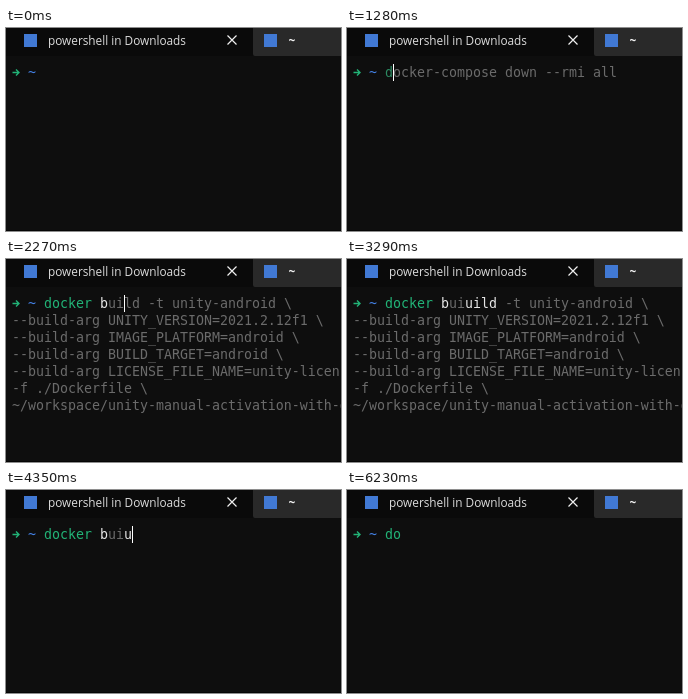
An HTML page with a canvas that plays this animation: 335x203 px, repeating every 6.3 s.

```html
<!DOCTYPE html>
<html lang="en">
<head>
<meta charset="utf-8">
<title>Terminal</title>
<style>
html, body { margin: 0; width: 100%; height: 100%; overflow: hidden; background: #0e0e0e; }
canvas { display: block; }
</style>
</head>
<body>
<canvas id="stage" width="335" height="203"></canvas>
<script>
const ctx = document.getElementById('stage').getContext('2d');
const LOOP = 6300;
const CELL = 8, ROW = 17, LEFT = 6, TOP = 36, INPUT = 38;
const MONO = '13.29px "DejaVu Sans Mono", monospace';
const TITLE = '11.8px "Open Sans", sans-serif';
const COLOR = {
  back: '#0e0e0e', tab: '#0a0a0a', idleTab: '#292929', icon: '#4179d4',
  title: '#dcdcdc', green: '#22b377', dimGreen: '#2c8a62', blue: '#4482e6',
  text: '#e6e6e6', ghost: '#6b6b6b'
};

const COMPOSE = 'docker-compose down --rmi all';
const RUN = 'docker run --rm -it unity-android /bin/bash';
const BUILD = 'docker build -t unity-android \\';
const REBUILD = 'docker buiuild -t unity-android \\';
const BUILD_ARGS = [
  '--build-arg UNITY_VERSION=2021.2.12f1 \\',
  '--build-arg IMAGE_PLATFORM=android \\',
  '--build-arg BUILD_TARGET=android \\',
  '--build-arg LICENSE_FILE_NAME=unity-license',
  '-f ./Dockerfile \\',
  '~/workspace/unity-manual-activation-with-docker'
];

// start time, suggested line, characters typed, cursor visible, extra rows visible
const STEPS = [
  [0, '', 0, false],
  [260, '', 0, true],
  [810, '', 0, false],
  [1210, 'd', 1, true],
  [1280, COMPOSE, 1, true],
  [1350, COMPOSE, 2, true],
  [1480, COMPOSE, 3, true],
  [1550, COMPOSE, 4, true],
  [1680, COMPOSE, 5, true],
  [1810, COMPOSE, 6, true],
  [1940, RUN, 7, true],
  [2270, BUILD, 10, true, true],
  [2340, REBUILD, 11, true, true],
  [2410, REBUILD, 12, true, true],
  [2540, REBUILD, 13, true, true],
  [2610, REBUILD, 14, true, true],
  [3290, REBUILD, 14, false, true],
  [3750, 'docker buiuil', 13, true, true],
  [3820, REBUILD, 13, true, true],
  [4350, 'docker buiu', 11, true],
  [4420, 'docker bu', 9, true],
  [4490, 'docker', 6, true],
  [4560, 'dock', 4, true],
  [4630, 'do', 2, true],
  [5570, 'do', 2, false],
  [6100, 'do', 2, true],
  [6230, 'do', 2, false]
];

function rect(x, y, w, h, color) {
  ctx.fillStyle = color;
  ctx.fillRect(x, y, w, h);
}

function text(str, x, baseline, color, font = MONO) {
  ctx.font = font;
  ctx.fillStyle = color;
  ctx.fillText(str, x, baseline);
}

function strokes(color, width, ...lines) {
  ctx.strokeStyle = color;
  ctx.lineWidth = width;
  ctx.beginPath();
  for (const [start, ...rest] of lines) {
    ctx.moveTo(...start);
    rest.forEach(point => ctx.lineTo(...point));
  }
  ctx.stroke();
}

function drawTabs() {
  rect(0, 0, 335, 28, COLOR.tab);
  ctx.fillStyle = COLOR.idleTab;
  ctx.beginPath();
  ctx.moveTo(247, 0);
  ctx.lineTo(335, 0);
  ctx.lineTo(335, 28);
  ctx.lineTo(249, 28);
  ctx.quadraticCurveTo(247, 28, 247, 26);
  ctx.fill();

  rect(18, 6, 13, 13, COLOR.icon);
  rect(258, 6, 13, 13, COLOR.icon);
  text('powershell in Downloads', 42, 17, COLOR.title, TITLE);
  text('~', 282.5, 17, '#f2f2f2', 'bold ' + TITLE);
  strokes('#f0f0f0', 1.2, [[221.5, 7.5], [230.5, 16.5]], [[230.5, 7.5], [221.5, 16.5]]);
}

function drawPrompt() {
  strokes(COLOR.green, 1.4, [[6.5, 44.5], [13, 44.5]], [[10, 41.5], [13, 44.5], [10, 47.5]]);
  text('~', LEFT + 2 * CELL, TOP + 13, COLOR.blue);
}

function drawInput(line, typed) {
  const baseline = TOP + 13;
  const span = (from, to, color) =>
    text(line.slice(from, to), INPUT + from * CELL, baseline, color);
  span(0, Math.min(typed, 6), typed === 1 ? COLOR.dimGreen : COLOR.green);
  if (typed > 6) span(6, Math.min(typed, 8), COLOR.text);
  // The shell leaves two cells of its suggestion behind the cursor.
  if (typed > 8) span(8, Math.min(typed, 10), COLOR.ghost);
  if (typed > 10) span(10, typed, COLOR.text);
  span(typed, line.length, COLOR.ghost);
}

function draw(time) {
  const [, line, typed, cursor, args] = STEPS.findLast(step => step[0] <= time);
  rect(0, 0, 335, 203, COLOR.back);
  rect(0, 202, 335, 1, '#050505');
  drawTabs();
  drawPrompt();
  drawInput(line, typed);
  if (args) {
    BUILD_ARGS.forEach((row, i) =>
      text(row, LEFT, TOP + 13 + (i + 1) * ROW, COLOR.ghost));
  }
  if (cursor) rect(INPUT + typed * CELL, TOP, 1, ROW, '#ffffff');
}

function tick() {
  draw(performance.now() % LOOP);
  requestAnimationFrame(tick);
}
tick();
</script>
</body>
</html>
```
